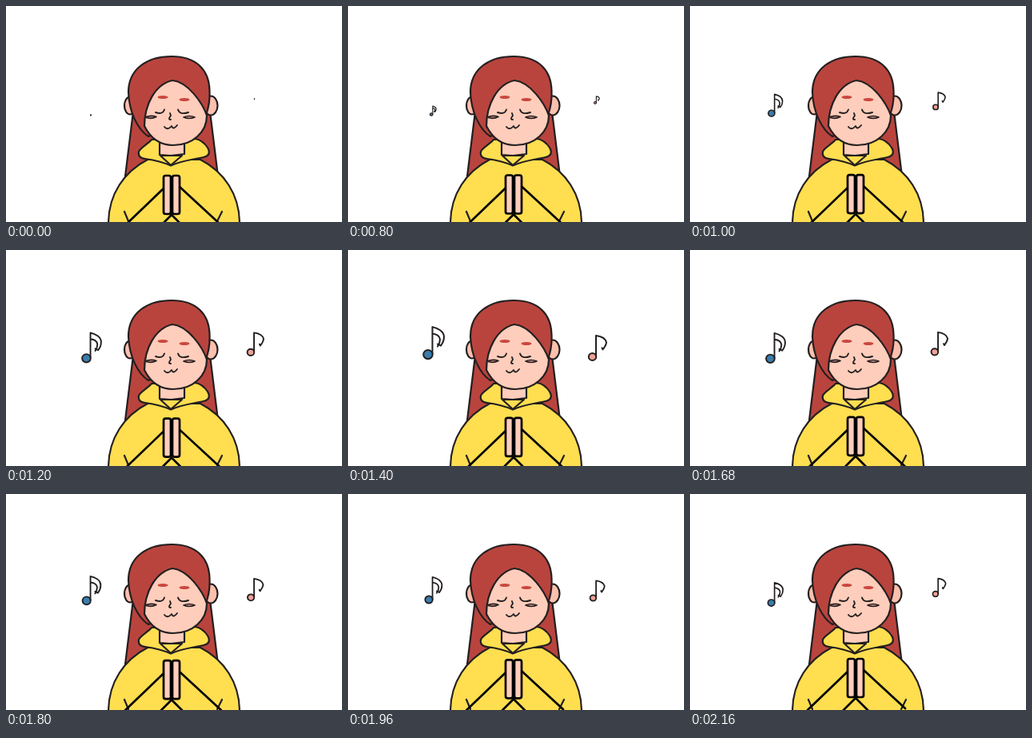
Animation of 420 by 270 pixels, one loop 2280 ms. Source, as an HTML page:

```html
<!DOCTYPE html>
<html lang="en">
<head>
<meta charset="utf-8">
<title>Humming girl</title>
<style>
html, body { margin: 0; width: 100%; height: 100%; overflow: hidden; background: #fff; }
svg { display: block; width: 420px; height: 270px; }
.line { fill: none; }
.hair { fill: #b9443e; }
.skin { fill: #ffcdbb; }
.ear { fill: #fbc0ae; }
.top { fill: #ffde50; }
.brow { fill: #c9473f; stroke: none; }
.note * { vector-effect: non-scaling-stroke; }
</style>
</head>
<body>
<svg viewBox="0 0 420 270" stroke="#231f20" stroke-width="2.200" stroke-linecap="round" stroke-linejoin="round">
  <!-- back hair and ears -->
  <path class="hair" d="M159 132L149 213H265L255 132Z"/>
  <ellipse class="ear" cx="155" cy="124.500" rx="7" ry="11"/>
  <ellipse class="ear" cx="256" cy="124.500" rx="8.500" ry="12"/>

  <!-- neck, jumper and hood -->
  <path class="top" d="M128 272C128 235 148 207 177 192H243C272 207 292 235 292 272Z"/>
  <path class="top" d="M182 167C177 173 168 177 166 182C165 187 167 190 174 191C188 193 196 195 206 199.500C220 193 234 192 247 189C255 187 255 182 252 177C248 171 242 167 237 166Z"/>
  <path class="skin" d="M192 166V186L206 187L223 185V166Z"/>
  <path class="top" d="M193 187H220L206 199Z"/>
  <path class="line" d="M148 257L153 269M270 257L264 269"/>

  <!-- head -->
  <path class="hair" d="M178 163C165 155 154 133 153 108C153 78 177 63 207 63C238 63 254 80 254.500 106C255 118 253 128 250 136Z"/>
  <path class="skin" d="M208 93C186 98 173 124 173 150C181 166 194 174 209 174C234 174 251 157 251 137C246 122 228 95 208 93Z"/>

  <!-- face -->
  <path class="line" stroke-width="1.900" d="M187 133Q196 136 198 129.500M215 129.500Q217 136.500 228 133M205 134L206 137Q202 142 206 142M198 151Q202 156 207 150Q209 155.500 214 149"/>
  <path fill="#ee9b90" stroke-width="1.700" d="M174 139Q181 136 188 138.500Q181 142 174 139ZM222 139Q229 136 236 139Q229 142 222 139Z"/>
  <ellipse class="brow" cx="196" cy="114" rx="6.500" ry="2"/>
  <ellipse class="brow" cx="223" cy="117" rx="6.500" ry="2"/>

  <!-- arms and hands -->
  <g id="hands" stroke="#000" stroke-width="2.700">
    <path class="line" d="M197 228L147 276M217 226L269 274M191 277L207 261L223 277"/>
    <rect class="skin" x="197" y="212" width="9" height="48" rx="2.500"/>
    <rect class="skin" x="208" y="212" width="9" height="48" rx="2.500"/>
  </g>

  <!-- each note is drawn around the centre of its head -->
  <g id="noteL" class="note">
    <ellipse fill="#3a7dad" rx="5.800" ry="5.600"/>
    <path class="line" d="M5.500 -1V-34.500C12 -33 20 -29 20 -22Q20 -16 16 -11M5.500 -26Q14 -25 15 -19Q15 -14 12 -10M16 -11L12 -13"/>
  </g>
  <g id="noteR" class="note">
    <ellipse fill="#f0a096" rx="4.700" ry="4.500"/>
    <path class="line" d="M4.500 -1V-26.500Q16 -25 17.500 -18Q17 -14 13 -9L12 -11"/>
  </g>
</svg>
<script>
const LOOP = 2280, HOLD = 800, LAST = 2160, STEP = 40, PEAK = 1400, BOB = 520;
const el = id => document.getElementById(id);

function noteScale(t) {
  if (t < HOLD) return 0.04;
  return t < PEAK
    ? 1 - 0.7 * ((PEAK - t) / 600) ** 2
    : 1 - 0.27 * ((t - PEAK) / 760) ** 1.3;
}

function placeNote(id, x, y, s) {
  const note = el(id);
  note.setAttribute("transform", `translate(${x} ${y}) scale(${s})`);
  note.setAttribute("stroke-width", 0.8 + 1.2 * s);
}

function draw(now) {
  const time = now % LOOP;
  const t = time < HOLD ? 0 : Math.min(LAST, Math.floor(time / STEP) * STEP);
  const lift = 6 * (t / LAST) ** 2.5;
  const s = noteScale(t);
  const bob = 2.6 * s * Math.cos(2 * Math.PI * (t - PEAK) / BOB);

  el("hands").setAttribute("transform", `translate(0 ${-lift})`);
  placeNote("noteL", 106 - 6 * s, 137 - 3.8 * s - bob, s);
  placeNote("noteR", 310.5 - 5 * s, 116 + 14.8 * s + bob, s);
}

const start = performance.now();
function frame() {
  draw(performance.now() - start);
  requestAnimationFrame(frame);
}
frame();
</script>
</body>
</html>
```
